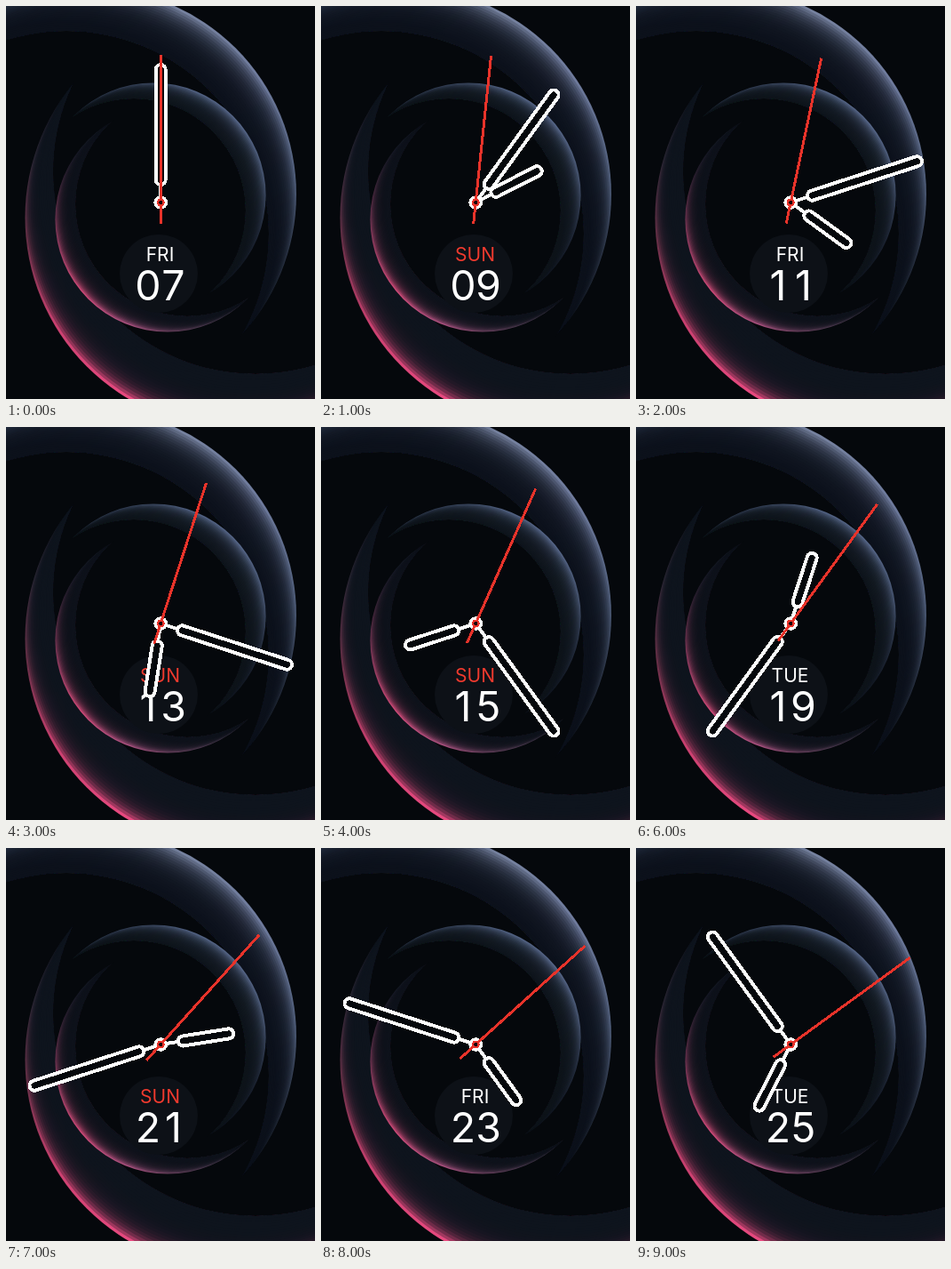
These frames come from a looping animation (348x442 px, 10 s). An HTML page with a canvas:

```html
<!DOCTYPE html>
<html lang="en">
<head>
<meta charset="utf-8">
<title>Watch face</title>
<style>
html, body { margin: 0; width: 100%; height: 100%; overflow: hidden; background: #05080c; }
canvas, svg { position: absolute; left: 0; top: 0; width: 348px; height: 442px; }
text { font-family: Inter, Roboto, sans-serif; text-anchor: middle; fill: #fff; }
#day { font-size: 21px; }
#date { font-size: 46.5px; }
.outline { fill: #05080c; stroke: #fff; stroke-width: 4; }
</style>
</head>
<body>
<canvas id="rings" width="348" height="442"></canvas>
<svg viewBox="0 0 348 442">
  <circle cx="172" cy="301" r="44" fill="#0d1117"/>
  <text id="day" x="173.5" y="287"></text>
  <text id="date" x="160 188.5" y="330.5"></text>
  <g transform="translate(174.2 221)" shape-rendering="crispEdges">
    <g id="hour" class="outline">
      <path d="M0 -7V-20"/>
      <rect x="-5.5" y="-83" width="11" height="63" rx="5.5"/>
    </g>
    <g id="minute" class="outline">
      <path d="M0 -7V-20"/>
      <rect x="-5.5" y="-155" width="11" height="135" rx="5.5"/>
    </g>
    <circle class="outline" r="5.8"/>
    <g id="second">
      <path d="M0 24V-166" stroke="#e8332a" stroke-width="3"/>
      <circle r="3.3" fill="#05080c" stroke="#e8332a" stroke-width="2.4"/>
    </g>
  </g>
</svg>
<script>
const ctx = document.getElementById('rings').getContext('2d');
const BANDS = 20;

function disc([x, y, r]) {
  ctx.moveTo(x + r, y);
  ctx.arc(x, y, r, 0, 2 * Math.PI);
}

// Crescent between two circles: lit along the outer edge, fading to navy inward in bands.
function crescent(outer, inner, fade, line, colors) {
  ctx.save();
  ctx.beginPath();
  disc(outer);
  ctx.clip();
  ctx.beginPath();
  ctx.rect(-400, -400, 1200, 1200);
  disc(inner);
  ctx.clip('evenodd');

  const light = ctx.createLinearGradient(...line);
  colors.forEach((color, i) => light.addColorStop(i / (colors.length - 1), color));
  ctx.fillStyle = light;
  ctx.fillRect(0, 0, 348, 442);

  ctx.fillStyle = `rgba(13, 19, 28, ${fade})`;
  for (let i = 1; i < BANDS; i++) {
    ctx.beginPath();
    disc(outer.map((v, k) => v + (inner[k] - v) * i / BANDS));
    ctx.fill();
  }
  ctx.restore();
}

crescent([94.5, 212, 232.5], [68, 256, 228], .2, [0, 0, 255, 385],
  ['#202a3c', '#76829f', '#6e7a9c', '#4e5c78', '#0c1119']);
crescent([258, 238, 236.5], [281, 186, 228], .32, [95, 70, 137, 442],
  ['#0d121b', '#2a2634', '#6a3048', '#c8406f', '#e84a80']);
crescent([166, 213, 126.6], [144, 230, 126], .17, [75, 125, 230, 322],
  ['#2a3548', '#506080', '#566688', '#46546f', '#121824']);
crescent([182, 240, 126.6], [204, 223, 126], .24, [120, 132, 275, 328],
  ['#161a26', '#8a3a5c', '#d04a78', '#a8507e', '#3a3344']);

const DAYS = ['FRI', 'SUN', 'FRI', 'SUN', 'SUN', 'FRI', 'TUE', 'SUN', 'FRI', 'TUE'];
const byId = id => document.getElementById(id);
const turn = (id, degrees) => byId(id).setAttribute('transform', `rotate(${degrees})`);
const start = performance.now();
let shown = -1;

function tick() {
  const step = Math.floor((performance.now() - start) / 1000) % 10;
  if (step !== shown) {
    shown = step;
    turn('hour', step * 63);
    turn('minute', step * 36);
    turn('second', step * 6);
    byId('day').textContent = DAYS[step];
    byId('day').style.fill = DAYS[step] === 'SUN' ? '#f03a2e' : '#fff';
    byId('date').textContent = String(7 + 2 * step).padStart(2, '0');
  }
  requestAnimationFrame(tick);
}
tick();
</script>
</body>
</html>
```
